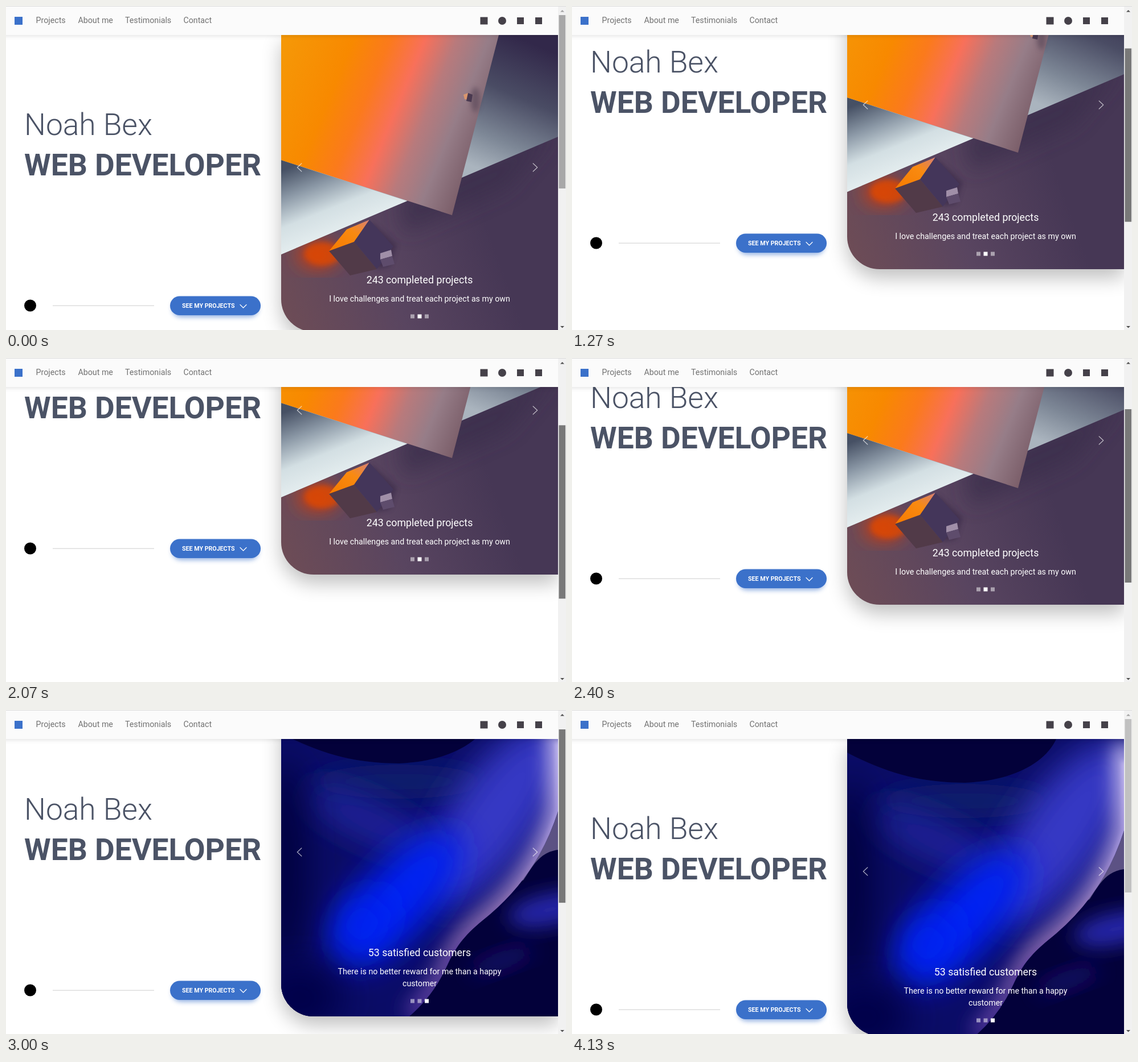
These frames come from a looping animation (983 by 570 pixels, 4270 ms). An HTML page:

```html
<!DOCTYPE html>
<html lang="en">
<head>
<meta charset="utf-8">
<title>Portfolio</title>
<style>
  html, body { margin: 0; height: 100%; overflow: hidden; background: #fff; }
  svg { display: block; width: 983px; height: 570px; font: 14.22px Roboto, sans-serif; }
  .nav text { fill: #727272; }
  .name { font-size: 53.33px; font-weight: 300; fill: #4b5366; }
  .role { font-size: 53.33px; font-weight: 700; fill: #4b5366; }
  .button { font-size: 10.67px; font-weight: 700; fill: #fff; }
  .caption { fill: #fff; text-anchor: middle; }
  .title { font-size: 17.78px; }
  .line { fill: none; stroke: #fff; stroke-width: 1.2; stroke-linecap: round; stroke-linejoin: round; }
</style>
</head>
<body>
<svg viewBox="0 0 983 570">
  <defs>
    <clipPath id="card"><path d="M483 51H969V573H540a57 57 0 0 1-57-57z"/></clipPath>
    <clipPath id="page"><path d="M0 0H969V570H0z"/></clipPath>
    <clipPath id="ribbon"><path id="ribbonShape" d="M483 75C560 115 620 128 690 128C770 125 830 95 850 51H969V212Q935 320 850 393C812 424 795 440 776 480Q752 535 708 573H483z"/></clipPath>
    <filter id="blur4" x="-50%" y="-50%" width="200%" height="200%"><feGaussianBlur stdDeviation="4"/></filter>
    <filter id="blur17" x="-50%" y="-50%" width="200%" height="200%"><feGaussianBlur stdDeviation="17"/></filter>
    <filter id="blur30" x="-80%" y="-80%" width="260%" height="260%"><feGaussianBlur stdDeviation="30"/></filter>
    <g id="chevron"><path class="line" d="M3.8-7L-3.7 0L3.8 7"/></g>

    <linearGradient id="sheet" gradientUnits="userSpaceOnUse" x1="483" y1="51" x2="853" y2="204">
      <stop offset="0" stop-color="#f59908"/>
      <stop offset=".3" stop-color="#f88900"/>
      <stop offset=".45" stop-color="#fb7a1c"/>
      <stop offset=".59" stop-color="#f8705a"/>
      <stop offset=".72" stop-color="#b87a7c"/>
      <stop offset=".85" stop-color="#967d88"/>
      <stop offset="1" stop-color="#7a5d68"/>
    </linearGradient>
    <linearGradient id="wall" gradientUnits="userSpaceOnUse" x1="945" y1="75" x2="850" y2="295">
      <stop offset="0" stop-color="#32284a"/>
      <stop offset=".4" stop-color="#4a4c64"/>
      <stop offset=".75" stop-color="#7d8796"/>
      <stop offset="1" stop-color="#aab4be"/>
    </linearGradient>
    <linearGradient id="pale" gradientUnits="userSpaceOnUse" x1="520" y1="275" x2="570" y2="400">
      <stop offset="0" stop-color="#465064"/>
      <stop offset=".35" stop-color="#8b98a6"/>
      <stop offset=".7" stop-color="#d3dfe3"/>
      <stop offset="1" stop-color="#e3ecee"/>
    </linearGradient>
    <linearGradient id="floor" gradientUnits="userSpaceOnUse" x1="483" y1="530" x2="850" y2="400">
      <stop offset="0" stop-color="#6d4c56"/>
      <stop offset=".5" stop-color="#594560"/>
      <stop offset="1" stop-color="#463755"/>
    </linearGradient>
    <linearGradient id="lit" x1="0" y1="1" x2="1" y2="0">
      <stop offset="0" stop-color="#f57a00"/>
      <stop offset=".6" stop-color="#f98a10"/>
      <stop offset="1" stop-color="#d58078"/>
    </linearGradient>
    <linearGradient id="rim" x1="0" y1="0" x2="0" y2="1">
      <stop offset="0" stop-color="#d6ccf8"/>
      <stop offset=".35" stop-color="#b5a5e6"/>
      <stop offset=".7" stop-color="#8f70b0"/>
      <stop offset="1" stop-color="#50329a"/>
    </linearGradient>
  </defs>

  <g clip-path="url(#page)"><g id="content">
    <text class="name" x="32" y="227">Noah Bex</text>
    <text class="role" x="32" y="298">WEB DEVELOPER</text>
    <circle cx="42.5" cy="527" r="10.5"/>
    <path d="M82 527.3H260" stroke="#dedede" stroke-width="1.5"/>
    <rect x="292" y="516" width="151" height="31" rx="15" fill="#3b71ca" opacity=".6" filter="url(#blur4)"/>
    <rect x="288" y="510.5" width="159" height="33.5" rx="16.75" fill="#3b71ca"/>
    <text class="button" x="309" y="531">SEE MY PROJECTS</text>
    <path class="line" d="M411 525.5L416.5 531L422 525.5"/>

    <path d="M483 66H969V588H540a57 57 0 0 1-57-57z" opacity=".25" filter="url(#blur17)"/>
    <g clip-path="url(#card)">
      <g id="cubes">
        <path d="M483 51H969V573H483z" fill="url(#floor)"/>
        <path d="M969 215L690 340L700 400L880 320z" fill="#3a2d4c" opacity=".7" filter="url(#blur17)"/>
        <ellipse cx="547" cy="438" rx="34" ry="20" fill="#e23a00" filter="url(#blur17)"/>
        <ellipse cx="556" cy="436" rx="32" ry="20" fill="#e04800" filter="url(#blur4)" opacity=".75"/>
        <path d="M865 51H969V230L483 437V271z" fill="url(#wall)"/>
        <path d="M483 271L704 343L483 437z" fill="url(#pale)"/>
        <path d="M483 51H865L783 368L483 271z" fill="url(#sheet)"/>
        <ellipse cx="824" cy="165" rx="8" ry="22" fill="#584758" filter="url(#blur4)" opacity=".65"/>
        <path d="M803 156L811 153L812 165L805 164z" fill="#d9966e"/>
        <path d="M811 153L819 156L817 169L808 167z" fill="#493950"/>
        <path d="M640 378L686 420L674 458L650 463z" fill="#3a2c48" opacity=".7" filter="url(#blur4)"/>
        <path d="M567 431L598 393L638 376L611 415z" fill="url(#lit)"/>
        <path d="M638 376L680 423L651 463L611 415z" fill="#44365a"/>
        <path d="M567 431L611 415L651 463L604 474z" fill="#513a48"/>
        <path d="M657 435L676 429L678 440L657 446z" fill="#a08fa8"/>
        <path d="M657 446L678 440L682 454L662 459z" fill="#5e4c6c"/>
        <g class="caption">
          <text class="title" x="726" y="488">243 completed projects</text>
          <text x="726" y="520">I love challenges and treat each project as my own</text>
        </g>
      </g>
      <g id="waves">
        <path d="M483 51H969V573H483z" fill="#03013a"/>
        <path d="M969 212Q950 275 905 335L969 300z" fill="#5c5284"/>
        <path d="M969 280C930 285 920 320 900 345L850 395L969 400z" fill="#03013a"/>
        <ellipse cx="955" cy="385" rx="75" ry="28" fill="#2826a8" filter="url(#blur17)" transform="rotate(-12 955 385)"/>
        <ellipse cx="870" cy="475" rx="60" ry="16" fill="#130f68" filter="url(#blur17)" transform="rotate(-20 870 475)"/>
        <g clip-path="url(#ribbon)">
          <path d="M483 51H969V573H483z" fill="#0a0c66"/>
          <ellipse cx="690" cy="160" rx="150" ry="30" fill="#0a1c6c" filter="url(#blur17)"/>
          <ellipse cx="860" cy="215" rx="75" ry="190" fill="#3438c4" filter="url(#blur30)" transform="rotate(35 860 215)"/>
          <ellipse cx="640" cy="230" rx="130" ry="30" fill="#2026a0" filter="url(#blur30)" transform="rotate(25 640 230)"/>
          <ellipse cx="690" cy="365" rx="150" ry="62" fill="#0224f4" filter="url(#blur30)" transform="rotate(-48 690 365)"/>
          <ellipse cx="625" cy="410" rx="60" ry="40" fill="#0222f2" filter="url(#blur30)" transform="rotate(-48 625 410)"/>
          <ellipse cx="490" cy="310" rx="38" ry="190" fill="#03013c" filter="url(#blur30)"/>
          <ellipse cx="515" cy="540" rx="75" ry="60" fill="#04014a" filter="url(#blur30)"/>
          <path d="M969 60V212Q935 320 850 393C812 424 795 440 776 480Q752 535 708 573" fill="none" stroke="url(#rim)" stroke-width="34" filter="url(#blur17)"/>
          <path d="M969 90V212Q935 320 850 393C812 424 795 440 776 480" fill="none" stroke="url(#rim)" stroke-width="6" filter="url(#blur4)"/>
        </g>
        <g class="caption">
          <text class="title" x="726" y="467">53 satisfied customers</text>
          <text x="726" y="498.5">There is no better reward for me than a happy</text>
          <text x="726" y="520">customer</text>
        </g>
      </g>
      <g opacity=".65">
        <use href="#chevron" x="515" y="284"/>
        <use href="#chevron" transform="translate(929 284) scale(-1 1)"/>
      </g>
      <g fill="#fff">
        <path d="M710 542.5h7v7h-7z" opacity=".5"/>
        <path id="dot2" d="M722.5 542.5h7v7h-7z"/>
        <path id="dot3" d="M735 542.5h7v7h-7z"/>
      </g>
    </g>
  </g>
  <path d="M-20 8H990V52H-20z" opacity=".13" filter="url(#blur4)"/></g>

  <g class="nav">
    <path d="M0 0H969V51H0z" fill="#fbfbfb"/>
    <path d="M0 .5H983" stroke="#dcdcdc"/>
    <path d="M15 19h14v14h-14z" fill="#3b71ca"/>
    <text x="52.5" y="30">Projects</text>
    <text x="126.5" y="30">About me</text>
    <text x="209" y="30">Testimonials</text>
    <text x="311.5" y="30">Contact</text>
    <path d="M832.5 19.5h13v13h-13zM897 20h12v12h-12zM929 20h12v12h-12z" fill="#454149"/>
    <circle cx="871" cy="26" r="7" fill="#454149"/>
  </g>

  <path d="M969 1H983V570H969z" fill="#f1f1f1"/>
  <path id="up" d="M973 10.5L976.5 7L980 10.5z"/>
  <path d="M973 563L976.5 566.5L980 563z" fill="#505050"/>
  <rect id="thumb" x="970.5" width="11.5" height="305"/>
</svg>
<script>
const LOOP = 4270, FPS = 15;
const $ = id => document.getElementById(id);
// [time in ms, scroll offset in px]
const path = [[267, 0], [333, 4], [800, 50], [1267, 110.5], [1867, 196], [2000, 196], [2067, 192],
  [2400, 139], [2533, 124], [3000, 34], [3067, 16], [3133, 3], [3200, 0]];

function scrollAt(t) {
  const i = path.findIndex(p => p[0] > t);
  if (i < 1) return 0;
  const [t0, a] = path[i - 1], [t1, b] = path[i];
  return Math.round(a + (b - a) * (t - t0) / (t1 - t0));
}

function fade(t) {
  const u = Math.min(1, Math.max(0, (t - 2400) / 580));
  return u * u * (3 - 2 * u);
}

function draw(now) {
  const t = Math.floor((now % LOOP + 4) * FPS / 1000) * 1000 / FPS;
  const y = scrollAt(t), f = fade(t);
  $('content').setAttribute('transform', `translate(0 ${-y})`);
  $('waves').setAttribute('opacity', f);
  $('dot2').setAttribute('opacity', 1 - f / 2);
  $('dot3').setAttribute('opacity', .5 + f / 2);
  $('thumb').setAttribute('y', 16 + y * .533);
  $('thumb').setAttribute('fill', t < 330 ? '#a8a8a8' : t < 3260 ? '#787878' : t < 3390 ? '#a8a8a8' : '#c1c1c1');
  $('up').setAttribute('fill', y ? '#505050' : '#a3a3a3');
}

const start = performance.now();
function tick() {
  draw(performance.now() - start);
  requestAnimationFrame(tick);
}
tick();
</script>
</body>
</html>
```
